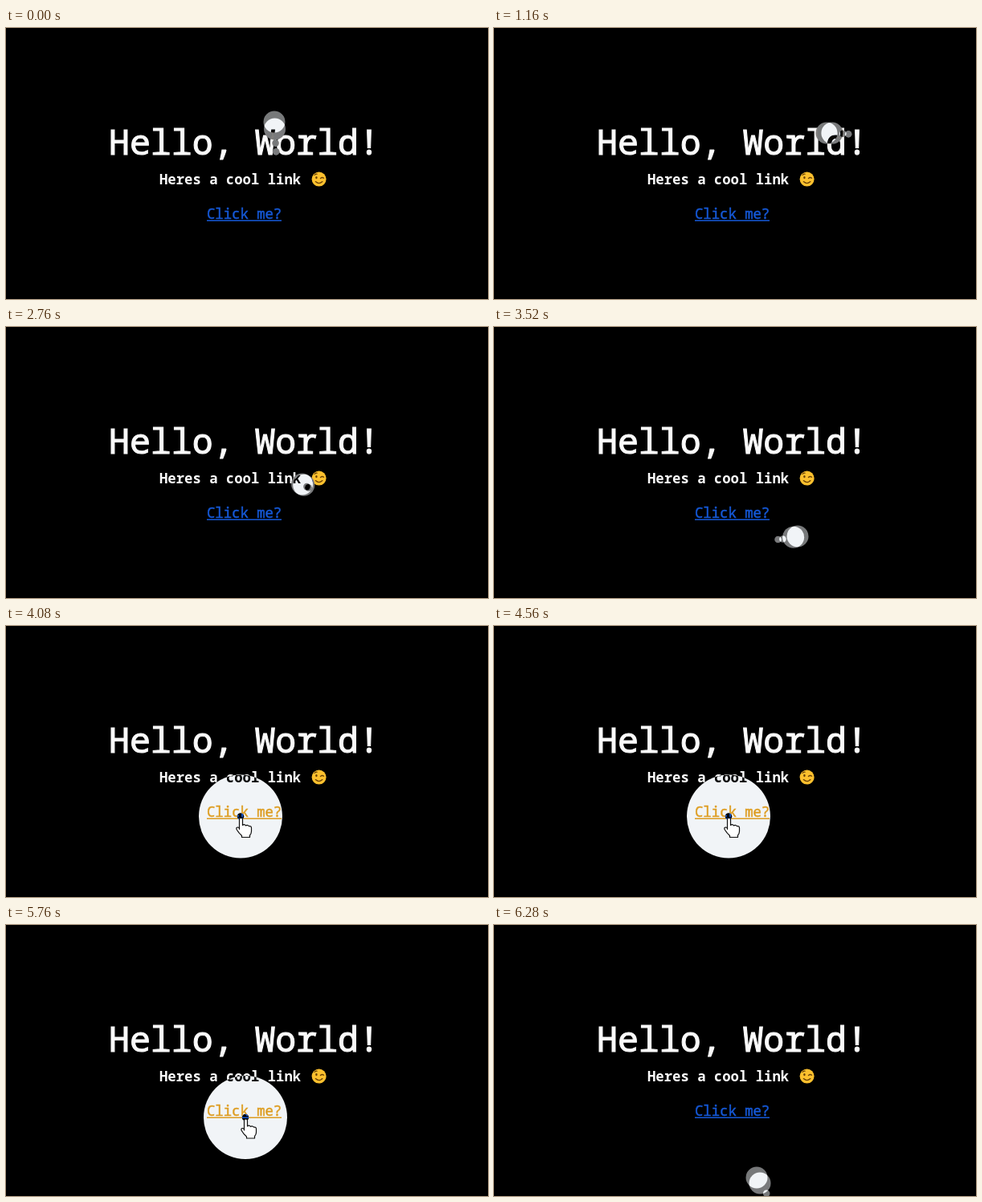
Write an HTML page that moves like this. It is 600 by 338 pixels and loops after 6.32 s.

```html
<!DOCTYPE html>
<html lang="en">
<head>
<meta charset="utf-8">
<title>Hello, World!</title>
<style>
  html, body { margin: 0; width: 100%; height: 100%; overflow: hidden; background: #000; }
  svg { position: absolute; left: 0; top: 0; isolation: isolate; }
  text { font-family: 'Roboto Mono', 'Noto Sans Mono', 'DejaVu Sans Mono', monospace; font-size: 17.28px; fill: #fafafa; }
  .title { font-size: 43.2px; stroke: #fafafa; stroke-width: 1.1; }
  .sub { font-weight: 700; }
  .link { fill: #1558d6; stroke: #1558d6; stroke-width: .5; }
  .ring, .dot { fill: #f1f4f7; mix-blend-mode: difference; }
</style>
</head>
<body>
<svg width="600" height="338" viewBox="0 0 600 338">
  <rect width="600" height="338"/>
  <text class="title" x="128" y="157.5">Hello, World!</text>
  <text class="sub" x="191" y="195">Heres a cool link</text>
  <g transform="translate(389.6 188.6)" fill="none" stroke="#6b4308" stroke-width="1.3" stroke-linecap="round">
    <circle r="9" fill="#fcc02e" stroke="none"/>
    <ellipse cx="-3.2" cy="-2" rx="1.2" ry="1.7" fill="#6b4308" stroke="none"/>
    <path d="M1.8-1q2-2 4.2-.4M-4.3 3q4.3 4 8.6 0M-5.5-5.2q1.4-1.5 3-1.2"/>
  </g>
  <text class="link" x="250" y="238">Click me?</text>
  <path class="link" d="M250 240.2h93" stroke-width="1" style="stroke-width:1.5"/>
  <circle class="ring"/>
  <circle class="dot" r="4.3"/>
  <path class="hand" fill="#fff" stroke="#111" stroke-width="1.2" stroke-linejoin="round"
    d="M-1.5 14V4a2 2 0 0 1 4 0V11q2-2 4 .5 2-1.5 4 .7 3-.7 3 2.3v4q0 3-2 5v2.5H1.5V24q-4-3.5-6.5-8-.5-2.5 1.5-2.5t2 2.5z"/>
</svg>
<script>
const LOOP = 6320, STEP = 40, LAG = 45, SHUTTER = 1000 / 60;

// key points of the pointer's walk: time, x, y
const path = [
  [0, 334, 117], [140, 338, 185], [420, 296, 185], [1040, 376, 133], [1160, 414, 131],
  [1240, 446, 133], [1420, 463, 146], [1920, 401, 162], [2040, 368, 174], [2085, 340, 186],
  [2200, 315, 195], [2560, 345, 189], [3100, 398, 224], [3400, 394, 257], [3520, 378, 261],
  [3580, 354, 265], [3850, 300, 256], [4000, 292, 237.5], [4930, 292, 237.5], [5290, 302, 280],
  [5480, 298, 240], [5900, 298, 240], [6200, 313, 287], [6280, 327, 315], [6370, 353, 356]
];

const clamp = v => Math.max(0, Math.min(1, v));
const ease = v => v * v * (3 - 2 * v);
const rate = (i, k) => (path[i + 1][k] - path[i][k]) / (path[i + 1][0] - path[i][0]);

// monotone slope, so the curve never overshoots its points
function slope(i, k) {
  if (!i || i > path.length - 2) return rate(i ? i - 1 : 0, k);
  const a = rate(i - 1, k), b = rate(i, k);
  return a * b > 0 ? 2 * a * b / (a + b) : 0;
}

function at(t) {
  let i = 0;
  while (i < path.length - 2 && path[i + 1][0] <= t) i++;
  const span = path[i + 1][0] - path[i][0], u = (t - path[i][0]) / span;
  return [1, 2].map(k => {
    const a = path[i][k], b = path[i + 1][k];
    return a + (b - a) * ease(u)
      + span * u * (1 - u) * ((1 - u) * slope(i, k) - u * slope(i + 1, k));
  });
}

function pose(svg, t) {
  const [x, y] = at(t), [px, py] = at(t + LAG);
  // the ring swells as it comes up to the link
  const grown = x < 345 && y > 215 ? ease(clamp((258 - y) / 14)) : 0;
  const put = (name, attrs) => {
    const el = svg.querySelector(name);
    for (const key in attrs) el.setAttribute(key, attrs[key]);
  };
  put('.ring', { cx: x, cy: y, r: 13.5 + 38.5 * grown });
  put('.dot', { cx: px, cy: py });
  put('.hand', { transform: `translate(${px} ${py})`, visibility: grown > 0.5 ? 'visible' : 'hidden' });
}

// each picture is the mean of two poses close in time
const base = document.querySelector('svg');
const blend = base.cloneNode(true);
blend.setAttribute('aria-hidden', 'true');
blend.style.opacity = 0.5;
base.after(blend);

const start = performance.now();
function tick() {
  const now = performance.now() - start;
  const t = Math.floor(now % LOOP / STEP) * STEP;
  pose(base, t);
  pose(blend, t + SHUTTER);
  requestAnimationFrame(tick);
}
tick();
</script>
</body>
</html>
```
